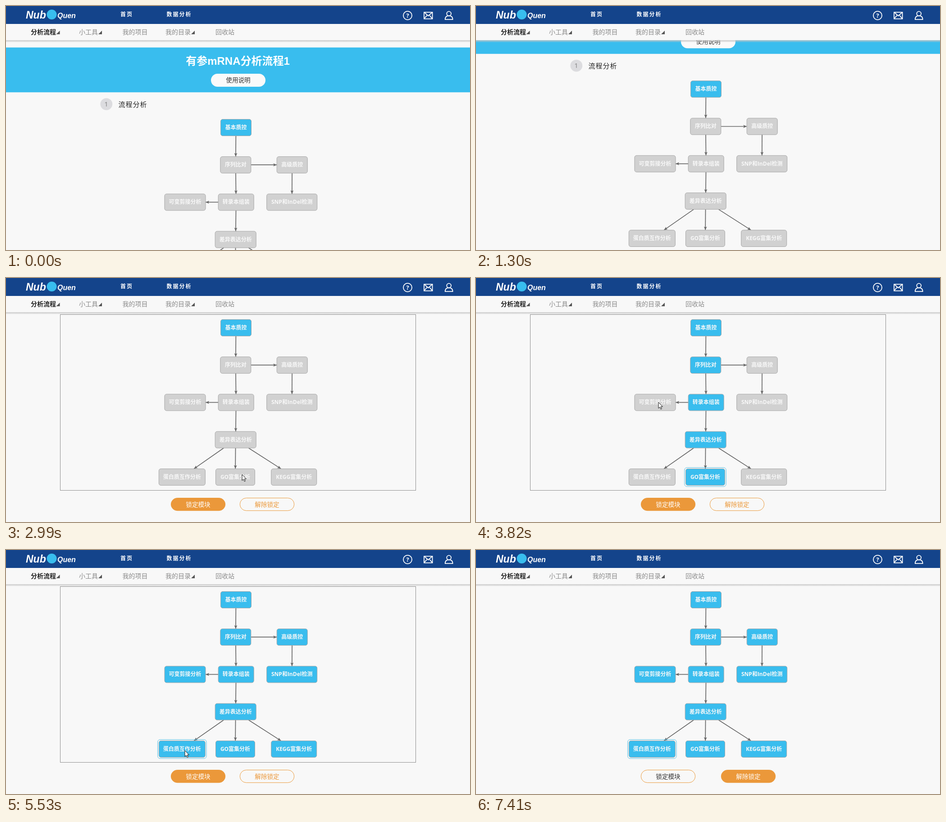
Recreate the animation shown at these times as an HTML page. Size 1030 by 544 pixels, loop 7840 ms.

```html
<!DOCTYPE html>
<html lang="zh-CN">
<head>
<meta charset="utf-8">
<style>
  html, body { margin: 0; width: 100%; height: 100%; overflow: hidden; background: #f8f8f8; }
  svg { display: block; font-family: "Open Sans", "Noto Sans CJK SC", "Noto Sans CJK", sans-serif; }
  .latin { font-family: "Liberation Sans", "Noto Sans CJK SC", "Noto Sans CJK", sans-serif; }
  .bold { font-weight: bold; }
  .mid { text-anchor: middle; }
  .node { stroke: #a6a6a6; }
  .label { font-size: 12px; font-weight: bold; fill: #f8f8f8; text-anchor: middle; }
  .button { font-size: 13.6px; text-anchor: middle; }
  .button rect { stroke: #eb9a3c; }
</style>
</head>
<body>
<svg width="1030" height="544" viewBox="0 0 1030 544">
  <defs>
    <marker id="arrow" markerUnits="userSpaceOnUse" markerWidth="9" markerHeight="8" refX="8" refY="4" orient="auto">
      <path d="M0 .6L8 4L0 7.4L2 4Z" fill="#666"/>
    </marker>
    <linearGradient id="shade" x2="0" y2="1">
      <stop stop-color="#bbb" stop-opacity=".9"/><stop offset="1" stop-color="#ccc" stop-opacity="0"/>
    </linearGradient>
  </defs>
  <rect width="1030" height="544" fill="#f8f8f8"/>

  <g id="page">
    <rect y="92.5" width="1030" height="99.9" fill="#39bdee"/>
    <text class="latin bold mid" x="514.5" y="130.5" font-size="24" fill="#fff">有参mRNA分析流程1</text>
    <rect x="455" y="151" width="121" height="29" rx="14.5" fill="#fafafa"/>
    <text class="mid" x="515.5" y="170" font-size="13.6" fill="#333">使用说明</text>
    <circle cx="222.8" cy="218.8" r="13.4" fill="#dcdcdf"/>
    <text class="mid" x="222.5" y="224" font-size="15" fill="#808080">1</text>
    <text x="249.5" y="224.5" font-size="15" letter-spacing="1" fill="#222">流程分析</text>
    <g id="edges" stroke="#666" stroke-width="1.7"></g>
    <g id="nodes"></g>
    <rect id="ring" fill="none" stroke="#5cc0e4" rx="5.5"/>
    <rect id="outline" x="120.5" y="241.5" width="789" height="392" fill="none" stroke="#222" stroke-dasharray="1 1"/>
    <g class="button" id="lock">
      <rect x="366.3" y="650.5" width="120.4" height="28.2" rx="14.1"/>
      <text x="426.5" y="669.5">锁定模块</text>
    </g>
    <g class="button" id="unlock">
      <rect x="519.3" y="650.5" width="120.4" height="28.2" rx="14.1"/>
      <text x="579.5" y="669.5">解除锁定</text>
    </g>
  </g>

  <rect width="1030" height="40" fill="#14448b"/>
  <rect y="40" width="1030" height="36.5" fill="#f8f8f8"/>
  <rect y="76.5" width="1030" height="5" fill="url(#shade)"/>
  <g class="latin bold" font-style="italic" fill="#fff">
    <text x="44" y="28" font-size="23">Nub</text>
    <text x="114" y="27" font-size="16">Quen</text>
  </g>
  <circle cx="101.5" cy="19" r="11" fill="#38bdee"/>
  <g class="bold" font-size="12" letter-spacing="2" fill="#fff">
    <text x="254" y="22.5">首页</text>
    <text x="356.5" y="22.5">数据分析</text>
  </g>
  <g font-size="14" fill="#8a8a8a">
    <text class="bold" x="55" y="63" fill="#222">分析流程</text>
    <text x="162" y="63">小工具</text>
    <text x="258.5" y="63">我的项目</text>
    <text x="354" y="63">我的目录</text>
    <text x="465" y="63">回收站</text>
  </g>
  <path d="M119.5 55v8h-8zM213 55v8h-8zM419 55v8h-8z" fill="#555"/>
  <g fill="none" stroke="#fff" stroke-width="1.8">
    <circle cx="891.5" cy="21.2" r="9.5"/>
    <path d="M928 13.8h18.6v14.8H928zl9.3 8.2l9.3-8.2M928 28.6l6.8-8.2M946.6 28.6l-6.8-8.2"/>
    <circle cx="983.2" cy="17" r="4.9"/>
    <path d="M974.8 30.2c0-5 2.5-7.6 6-8.2h4.8c3.5 .6 6 3.2 6 8.2z"/>
  </g>
  <text class="bold mid" x="891.5" y="26" font-size="13" fill="#fff">?</text>
  <path id="cursor" d="M0 0V13.5L3 10.7L5.2 15.6L7.3 14.7L5.2 9.9H9.4Z" fill="#fff" stroke="#111"/>
</svg>

<script>
const LOOP = 7840, TOP = 271, ROW = 83.2, HALF = 18.45;
const BLUE = '#39bdee', GRAY = '#d1d1d1', ORANGE = '#eb983a';
const $ = id => document.getElementById(id);

function set(el, attrs) {
  for (const key in attrs) el.setAttribute(key, attrs[key]);
}
function add(parent, tag, attrs, text = '') {
  const el = document.createElementNS('http://www.w3.org/2000/svg', tag);
  set(el, attrs);
  el.textContent = text;
  return parent.appendChild(el);
}

// label, centre x, row, width
const nodes = [
  ['基本质控', 510.5, 0, 68], ['序列比对', 509.8, 1, 68], ['高级质控', 635.2, 1, 68],
  ['可变剪接分析', 397.5, 2, 91], ['转录本组装', 510.7, 2, 79], ['SNP和InDel检测', 634.7, 2, 112],
  ['差异表达分析', 509.7, 3, 91], ['蛋白质互作分析', 390.8, 4, 103], ['GO富集分析', 509, 4, 87],
  ['KEGG富集分析', 639.2, 4, 101]
].map(([label, x, row, w]) => {
  const y = TOP + row * ROW;
  const box = add($('nodes'), 'rect', { class: 'node', x: x - w / 2, y: y - HALF, width: w, height: 2 * HALF, rx: 4.5 });
  add($('nodes'), 'text', { class: 'label', x, y: y + 4 }, label);
  return { x, y, w, box, litAt: Infinity };
});

for (const [from, to] of [[0, 1], [1, 2], [1, 4], [2, 5], [4, 3], [4, 6], [6, 7], [6, 8], [6, 9]]) {
  const a = nodes[from], b = nodes[to], dx = b.x - a.x, dy = b.y - a.y;
  const cut = n => Math.min(n.w / 2 / Math.abs(dx), HALF / Math.abs(dy));
  const p = cut(a), q = 1 - cut(b);
  add($('edges'), 'line', {
    x1: a.x + dx * p, y1: a.y + dy * p, x2: a.x + dx * q, y2: a.y + dy * q, 'marker-end': 'url(#arrow)'
  });
}

// The picture advances in bursts of five ticks; all poses below are keyed by tick.
const bursts = [[1090, 1930], [2360, 3200], [3410, 4250], [4460, 5320], [5530, 6370], [6580, 7410]];
const ticks = bursts.flatMap(([a, b]) => [0, 1, 2, 3, 4].map(k => a + (b - a) * k / 4));
const scrollStops = [0, 44, 85.7, 122, 151.7, 160];

// Each click lights a node together with its prerequisites.
const clicks = [
  { at: 0, lights: [0] }, { at: 10, node: 8, lights: [1, 4, 6, 8] }, { at: 13, node: 3, lights: [3] },
  { at: 16, node: 5, lights: [2, 5] }, { at: 18, node: 9, lights: [9] }, { at: 21, node: 7, lights: [7] }
];
for (const click of clicks) for (const i of click.lights) nodes[i].litAt = click.at;

// tick, x, y of the pointer tip
const pointer = [
  [6, 580, 345], [9, 524, 438], [10, 524, 438], [12, 405, 277], [13, 405, 277], [15, 644, 277],
  [16, 644, 360], [17, 644, 441], [18, 644, 441], [20, 397, 447], [21, 397, 447], [24, 430, 508],
  [25, 430, 514], [26, 430, 514], [29, 436, 518]
];
function pointerAt(n) {
  const i = pointer.findIndex(p => p[0] >= n), b = pointer[i], a = pointer[Math.max(i - 1, 0)];
  const k = b[0] > a[0] ? (n - a[0]) / (b[0] - a[0]) : 0;
  return [a[1] + (b[1] - a[1]) * k, a[2] + (b[2] - a[2]) * k];
}

function paintButton(id, filled, textColor) {
  set($(id).children[0], { fill: filled ? ORANGE : '#f8f8f8' });
  set($(id).children[1], { fill: textColor });
}
const show = (el, on) => set(el, { visibility: on ? 'visible' : 'hidden' });

function draw(time) {
  const n = ticks.filter(t => t <= time).length;
  set($('page'), { transform: `translate(0 ${-scrollStops[Math.min(n, 5)]})` });
  for (const node of nodes) set(node.box, { fill: n >= node.litAt ? BLUE : GRAY });

  const selected = nodes[clicks.filter(c => c.at <= n).pop().node];
  show($('ring'), selected);
  if (selected) {
    const { x, y, w } = selected;
    set($('ring'), { x: x - w / 2 - 2.7, y: y - HALF - 2.7, width: w + 5.4, height: 2 * HALF + 5.4 });
  }
  show($('outline'), n >= 9 && n < 26);

  const locked = n >= 26;
  paintButton('lock', !locked, locked ? '#333' : '#fff');
  paintButton('unlock', locked, locked ? '#fff' : ORANGE);
  set($('unlock'), { transform: `translate(${locked ? 25 : 0} 0)` });

  const visible = n >= 6 && n < 30;
  show($('cursor'), visible);
  if (visible) set($('cursor'), { transform: `translate(${pointerAt(n)})` });
}

function loop() {
  draw(performance.now() % LOOP);
  requestAnimationFrame(loop);
}
loop();
</script>
</body>
</html>
```
